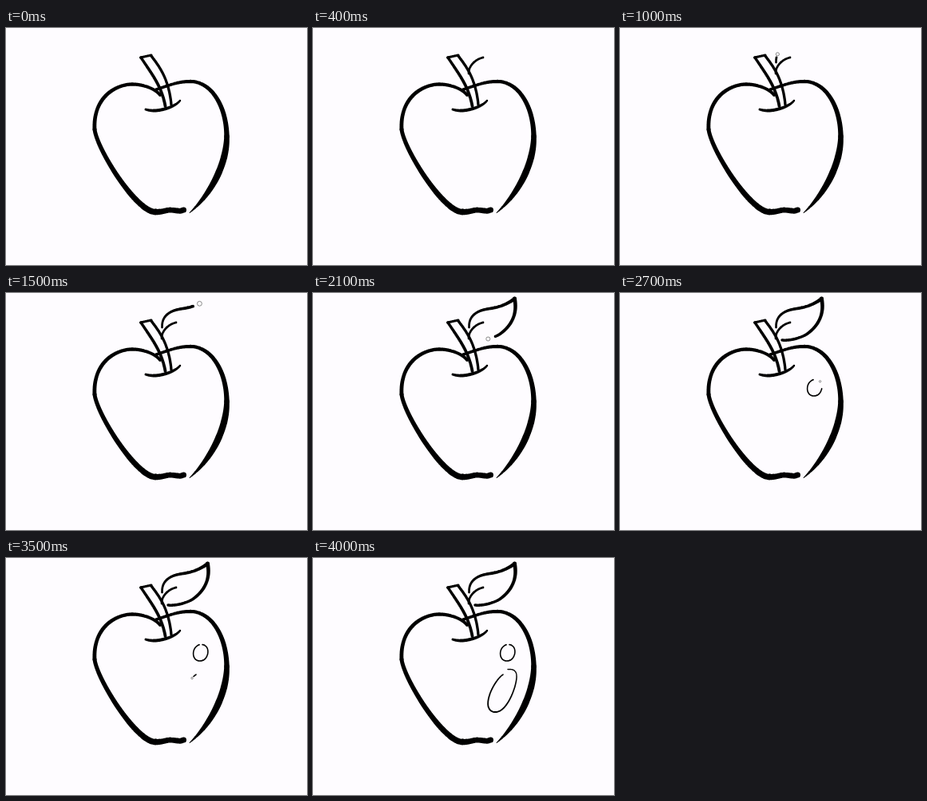
Animation of 377x297 px, one loop 4.1 s. Source, as an HTML page with a canvas:

```html
<!DOCTYPE html>
<html lang="en">
<head>
<meta charset="utf-8">
<title>Drawing an apple</title>
<style>
  html, body { margin: 0; width: 100%; height: 100%; overflow: hidden; background: #fefcff; }
  canvas { display: block; width: 377px; height: 297px; }
</style>
</head>
<body>
<canvas id="stage" width="377" height="297"></canvas>
<script>
const ctx = document.getElementById('stage').getContext('2d');
const LOOP = 4100, STEP = 100, SPACING = 0.75;

// A brush line: a curve whose width runs from a to c, pulled towards b on the way.
function line(d, a, b = a, c = a) {
  const path = document.createElementNS('http://www.w3.org/2000/svg', 'path');
  path.setAttribute('d', d);
  const length = path.getTotalLength();
  const count = Math.ceil(length / SPACING);
  const dots = Array.from({ length: count + 1 }, (_, i) => {
    const u = i / count, v = 1 - u;
    const { x, y } = path.getPointAtLength(u * length);
    return { x, y, r: (a * v * v + 2 * b * u * v + c * u * u) / 2 };
  });
  return { dots, length };
}

const apple = [
  line('M193 84 C186 75 170 70.5 158 70.5 C134 71 109 90 111 127', 4, 4.5, 5),
  line('M111 127 C114 152 162.7 230 187 230.5', 5, 5.5, 7.5),
  line('M187 230.5 C198 231 200 227 210 228.5 S219 229 222.5 228', 7.5, 6, 7),
  line('M188 77 C200 74 212 67 231 67 C256 67 276 96 276.5 136', 3.5, 4.5, 6.5),
  line('M276.5 136 C276.5 172 255 210 230 231.5', 6.5, 12, 1),
  line('M169 37 C180 54 195 72 199.5 98', 3.5, 4, 4),
  line('M168.5 37 L182 34', 3),
  line('M181.5 34.5 C192 48 204 64 207 96', 3.5),
  line('M175 102 C188 107 212 99 218 91', 3, 5.5, 2.5)
];

const strokes = [
  { from: 50, to: 400, ...line('M195 57 C195 47 204 39 213 37', 2.8) },
  { from: 900, to: 1700, ...line('M195.5 43 C195 24 212 21 222 19.5 S244 14 252.5 7', 2.8, 3.5, 4.5) },
  { from: 1700, to: 2250, ...line('M252.5 7 C257 30 245 43 236 50 S212 60 203 59', 5, 3.5, 3.5) },
  { from: 2350, to: 2800, ...line('M242 108.7 C232 112 232 129 243 129 C254 129 257 110 246 108.5', 1.7) },
  { from: 3470, to: 4000, ...line('M238 146 C226 154 209 190 227 193 C242 195 254 164 255 150 C255.5 141 251 139 244 139.5', 1.7, 2.4, 1.4) }
];

// The lifted brush glides between strokes.
const glides = [
  { from: 500, to: 1000, start: [211, 38], end: [194.5, 45.5] },
  { from: 2900, to: 3200, start: [235.5, 125], end: [240, 160] },
  { from: 3200, to: 3500, start: [240, 160], end: [237, 144] }
];

const progress = (time, { from, to }) => Math.min(1, (time - from) / (to - from));

// One fill for all dots keeps the edges clean.
function ink({ dots }, part = 1) {
  ctx.fillStyle = '#000';
  ctx.beginPath();
  for (const { x, y, r } of dots.slice(0, Math.ceil(part * dots.length))) {
    ctx.moveTo(x + r, y);
    ctx.arc(x, y, r, 0, Math.PI * 2);
  }
  ctx.fill();
}

function ring(x, y, r, color, dash = []) {
  ctx.strokeStyle = color;
  ctx.setLineDash(dash);
  ctx.beginPath();
  ctx.arc(x, y, r, 0, Math.PI * 2);
  ctx.stroke();
}

function drawStroke(stroke, time) {
  const part = progress(time, stroke) ** 1.2;
  ink(stroke, part);
  if (part === 1) return;
  // the pen runs ahead of its ink, further once it has got going
  const done = part * stroke.length;
  const ahead = Math.round((done + Math.min(10, done * 0.7)) / SPACING);
  const pen = stroke.dots[Math.min(ahead, stroke.dots.length - 1)];
  ring(pen.x, pen.y, pen.r * 1.4, '#888');
}

function drawGlide(glide, time) {
  const ease = 1 - (1 - progress(time, glide)) ** 3;
  const [x, y] = glide.start.map((s, i) => s + (glide.end[i] - s) * ease);
  ring(x, y, 31, '#d9bcd6');
  ring(x, y, 31, '#8b968c', [2, 2]);
}

function draw(time) {
  ctx.fillStyle = '#fefcff';
  ctx.fillRect(0, 0, 377, 297);
  apple.forEach(part => ink(part));
  strokes.filter(s => time > s.from).forEach(s => drawStroke(s, time));
  glides.filter(g => time >= g.from && time < g.to).forEach(g => drawGlide(g, time));
}

let shown = -1;
function loop(now) {
  const time = Math.floor(now % LOOP / STEP) * STEP;
  if (time !== shown) draw(shown = time);
  requestAnimationFrame(loop);
}
draw(0);
requestAnimationFrame(loop);
</script>
</body>
</html>
```
